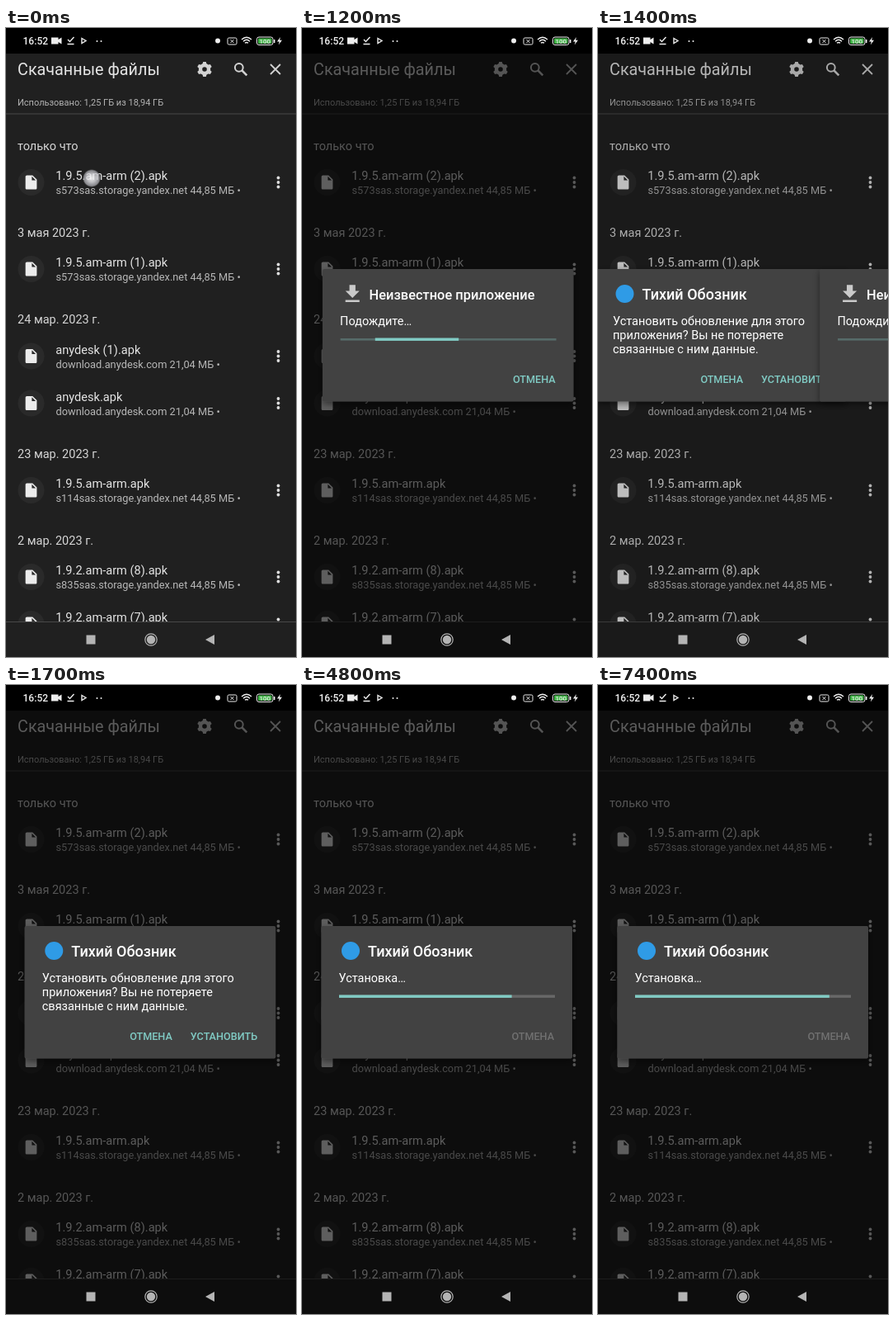
An HTML page for the animation above (8 s loop, 352 by 762 pixels).

```html
<!DOCTYPE html>
<html lang="ru">
<head>
<meta charset="utf-8">
<style>
html, body { margin: 0; width: 100%; height: 100%; overflow: hidden; background: #202020; }
svg { display: block; font-family: Roboto, sans-serif; }
text { white-space: pre; }
.head { font-size: 14.5px; fill: #d6d6d6; }
.name { font-size: 14.6px; fill: #e4e4e4; }
.info { font-size: 12.8px; fill: #b8b8b8; }
.title { font-weight: 500; fill: #fff; }
.body { font-size: 14.5px; fill: #fff; }
.btn { font-size: 12.65px; font-weight: 500; fill: #80cbc4; }
</style>
</head>
<body>
<svg width="352" height="762" viewBox="0 0 352 762">
  <defs>
    <filter id="shadow" x="-10%" y="-10%" width="120%" height="125%">
      <feDropShadow dx="0" dy="3" stdDeviation="4" flood-opacity=".5"/>
    </filter>
    <radialGradient id="glow">
      <stop offset="0" stop-color="#fff" stop-opacity=".9"/>
      <stop offset=".45" stop-color="#e6e6ea" stop-opacity=".8"/>
      <stop offset=".85" stop-color="#b4b4ba" stop-opacity=".7"/>
      <stop offset="1" stop-color="#999" stop-opacity="0"/>
    </radialGradient>
    <path id="doc" d="M6 2C4.9 2 4 2.9 4 4V20C4 21.1 4.9 22 6 22H18C19.1 22 20 21.1 20 20V8L14 2ZM13 9V3.5L18.5 9Z"/>
  </defs>

  <g id="page">
    <text x="14" y="56.5" font-size="19.8" fill="#e4e4e4">Скачанные файлы</text>
    <g fill="none" stroke="#d2d2d2">
      <circle cx="241" cy="50" r="5" stroke-width="4.4"/>
      <g id="teeth" fill="#d2d2d2" stroke="none"></g>
      <circle cx="282.8" cy="47.8" r="4.9" stroke-width="2"/>
      <path d="M286.5 51.5L292.3 57.3" stroke-width="2.5"/>
      <path d="M321 44L333 56M333 44L321 56" stroke-width="1.8"/>
    </g>
    <text x="14" y="93.5" font-size="11" fill="#b4b4b4">Использовано: 1,25 ГБ из 18,94 ГБ</text>
    <path d="M0 104H352" stroke="#484848"/>
    <g id="list"></g>
    <rect y="719" width="352" height="43" fill="#202020"/>
    <path d="M0 719.5H352" stroke="#484848"/>
  </g>
  <rect id="dim" width="352" height="762" opacity="0"/>

  <!-- status bar -->
  <rect width="352" height="31"/>
  <g fill="#eee">
    <text x="20.5" y="20" font-size="12.1" font-weight="500">16:52</text>
    <path d="M55 11.5H63.5V14L67.5 11.5V19.5L63.5 17V19.5H55Z"/>
    <path d="M75 14L77.5 16.5L82.5 11M74.5 19.5H82.5" fill="none" stroke="#eee" stroke-width="1.4"/>
    <path d="M92 12.5L97 15.5L92 18.5Z" fill="none" stroke="#eee" stroke-width="1.4"/>
    <circle cx="110.5" cy="16" r="1"/><circle cx="115.5" cy="16" r="1"/>
    <circle cx="257" cy="15.5" r="3"/>
    <g fill="none" stroke="#eee">
      <rect x="269" y="12" width="11" height="8" rx="1.5"/>
      <path d="M272.5 14L276.5 18M276.5 14L272.5 18"/>
      <path d="M286 14Q292 8.5 298 14M288 16.2Q292 12.5 296 16.2M290 18.3Q292 16.5 294 18.3" stroke-width="1.4"/>
      <rect x="304.5" y="11" width="19.5" height="9.5" rx="2.5"/>
    </g>
    <rect x="306" y="12.5" width="16.5" height="6.5" rx="1" fill="#43b649"/>
    <rect x="325" y="14" width="1.5" height="4"/>
    <text x="314.2" y="18.7" font-size="8" font-weight="500" text-anchor="middle">100</text>
    <path d="M333 11L329 16.5H331.8L330.8 20.5L335 14.8H332.2Z"/>
  </g>

  <!-- navigation bar -->
  <g fill="#b4b4b4">
    <rect x="97.5" y="735.5" width="11" height="11"/>
    <circle cx="176" cy="741" r="5.2"/>
    <circle cx="176" cy="741" r="7.2" fill="none" stroke="#b4b4b4" stroke-width="1.2"/>
    <path d="M242 741L253 735V747Z"/>
  </g>

  <g id="install">
    <rect class="panel"/>
    <circle cx="59" cy="322" r="11" fill="#2f9be6"/>
    <text class="title" x="80" y="329" font-size="18">Тихий Обозник</text>
    <g id="ask">
      <text class="body" x="44.5" y="359.5">Установить обновление для этого</text>
      <text class="body" x="44.5" y="376.5">приложения? Вы не потеряете</text>
      <text class="body" x="44.5" y="393.5">связанные с ним данные.</text>
      <text class="btn" x="151" y="430">ОТМЕНА</text>
      <text class="btn" x="224.5" y="430">УСТАНОВИТЬ</text>
    </g>
    <g id="busy">
      <text class="body" x="44.5" y="359.5">Установка…</text>
      <rect x="45" y="375.5" width="262" height="3.4" fill="#686868"/>
      <rect id="bar" x="45" y="375.5" height="3.4" fill="#80cbc4"/>
      <text id="cancel" class="btn" x="254.5" y="430">ОТМЕНА</text>
    </g>
  </g>

  <g id="wait">
    <rect class="panel"/>
    <path d="M19 9h-4V3H9v6H5l7 7 7-7zM5 18v2h14v-2z" fill="#cacaca" transform="translate(45 307.5) scale(1.22)"/>
    <text class="title" x="80" y="328.5" font-size="16.4">Неизвестное приложение</text>
    <text class="body" x="44.5" y="359.5">Подождите…</text>
    <rect x="45" y="376" width="262" height="2.6" fill="#566b69"/>
    <rect id="runner" y="375.5" height="3.4" fill="#80cbc4"/>
    <text class="btn" x="254.5" y="430">ОТМЕНА</text>
  </g>

  <circle id="touch" r="11" fill="url(#glow)"/>
</svg>

<script>
const $ = id => document.getElementById(id);
const set = (el, attrs) => { for (const k in attrs) el.setAttribute(k, attrs[k]); };
const show = (el, on) => set(el, { visibility: on ? 'visible' : 'hidden' });
const clamp = x => Math.min(1, Math.max(0, x));

const sections = [[148, 'только что'], [253, '3 мая 2023 г.'], [358, '24 мар. 2023 г.'],
  [521, '23 мар. 2023 г.'], [626, '2 мар. 2023 г.']];
const cloud = n => `s${n}sas.storage.yandex.net 44,85 МБ •`;
const desk = 'download.anydesk.com 21,04 МБ •';
const files = [
  [187, '1.9.5.am-arm (2).apk', cloud(573)],
  [292, '1.9.5.am-arm (1).apk', cloud(573)],
  [397.5, 'anydesk (1).apk', desk],
  [454.5, 'anydesk.apk', desk],
  [560, '1.9.5.am-arm.apk', cloud(114)],
  [665, '1.9.2.am-arm (8).apk', cloud(835)],
  [722, '1.9.2.am-arm (7).apk', '']
];
const dot = y => `<circle cx="330.5" cy="${y}" r="1.9" fill="#dcdcdc"/>`;
$('list').innerHTML =
  sections.map(([y, s]) => `<text class="head" x="14" y="${y}">${s}</text>`).join('') +
  files.map(([y, name, info]) => `
    <circle cx="30.5" cy="${y}" r="16" fill="#2a2a2a"/>
    <use href="#doc" fill="#ececec" transform="translate(20.2 ${y - 10.3}) scale(.86)"/>
    <text class="name" x="60.3" y="${y - 3}">${name}</text>
    <text class="info" x="60.5" y="${y + 14}">${info}</text>
    ${dot(y - 5.5)}${dot(y)}${dot(y + 5.5)}`).join('');

$('teeth').innerHTML = [0, 1, 2, 3, 4, 5].map(i =>
  `<path d="M238.5 44L239.2 41H242.8L243.5 44Z" transform="rotate(${i * 60} 241 50)"/>`).join('');

document.querySelectorAll('.panel').forEach(p => set(p, {
  x: 23.3, y: 292, width: 304.7, height: 160.5, rx: 2, fill: '#434343', filter: 'url(#shadow)'
}));

// piecewise linear curve through [time, value] points
function curve(t, points) {
  let [t0, v0] = points[0];
  for (const [t1, v1] of points) {
    if (t < t1) return t1 > t0 ? v0 + (v1 - v0) * (t - t0) / (t1 - t0) : v0;
    [t0, v0] = [t1, v1];
  }
  return v0;
}

const decay = ms => Math.exp(-0.012 * Math.max(0, ms));
const slide = (el, dx) => set(el, { transform: `translate(${dx.toFixed(2)} 0)` });

function draw(t) {
  const swap = 1300;

  set($('dim'), { opacity: 0.6 * (t < swap ? clamp((t - 700) / 300) : clamp((t - swap) / 300)) });

  show($('wait'), t >= 800 && t < 2000);
  slide($('wait'), t <= swap ? 352 * decay(t - 750) : 352 * (1 - decay(t - swap)));
  const mid = curve(t, [[700, -0.05], [1200, 0.3545], [1300, 0.4175], [1700, 0.8]]);
  const half = curve(t, [[700, 0.04], [1200, 0.1935], [1300, 0.2195], [1700, 0.3]]);
  const left = clamp(mid - half), right = clamp(mid + half);
  set($('runner'), { x: 45 + 262 * left, width: 262 * (right - left) });

  const open = t > swap;
  show($('install'), open);
  slide($('install'), -88 * decay(t - swap));
  show($('ask'), open && t < 3400);
  show($('busy'), t >= 3400);
  const done = t < 6200 ? 0.8 * clamp((t - 3600) / 900) : 0.9;
  set($('bar'), { width: 262 * done });
  $('cancel').style.fill = t < 4800 ? '#80cbc4' : '#707070';

  const pressed = t >= 2400 && t < 2600;
  set($('touch'), {
    cx: pressed ? 268 : 104, cy: pressed ? 431 : 182,
    opacity: pressed ? 0.8 : clamp(1 - t / 300)
  });
}

function tick() {
  draw(Math.floor(performance.now() % 8000 / 100) * 100);
  requestAnimationFrame(tick);
}
tick();
</script>
</body>
</html>
```
